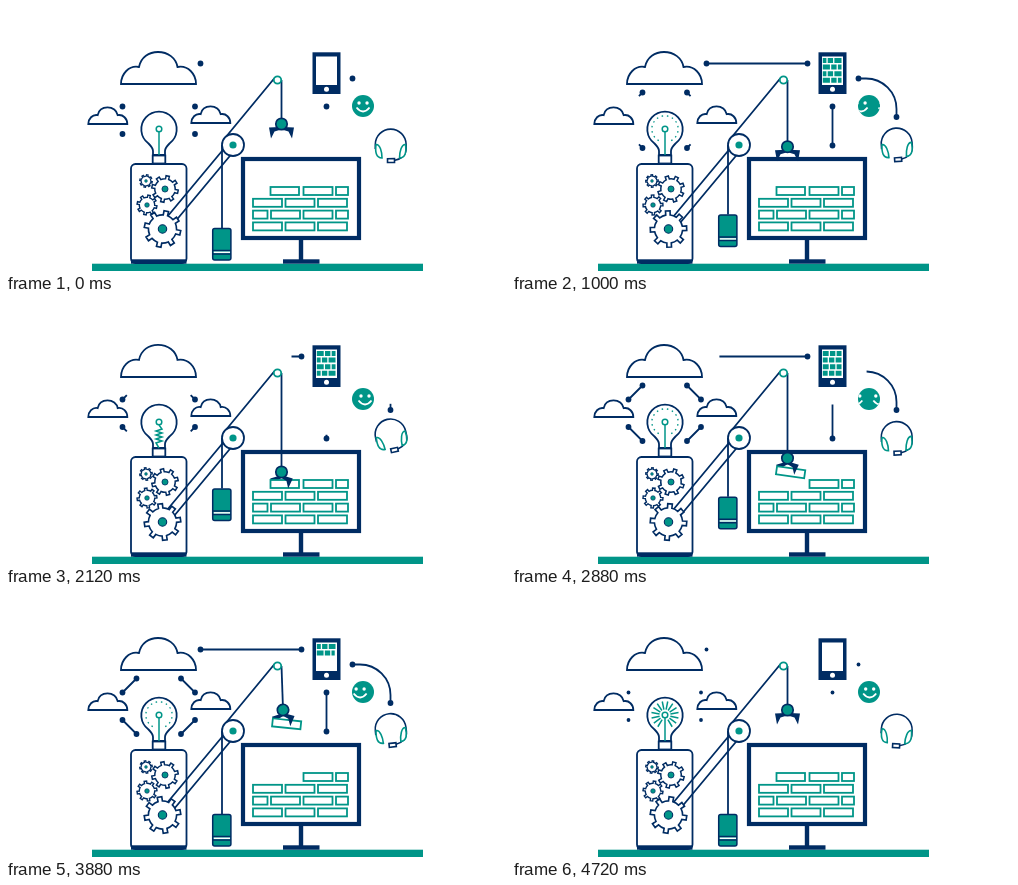
Write an HTML page that moves like this. It is 500 by 265 pixels and loops after 4.76 s.

```html
<!DOCTYPE html>
<html lang="en">
<head>
<meta charset="utf-8">
<title>Building machine</title>
<style>
html, body { margin: 0; width: 100%; height: 100%; overflow: hidden; background: #fff; }
svg { display: block; width: 500px; height: 265px; }
.line { fill: none; stroke: #002c63; stroke-width: 1.8; }
.box { fill: #fff; stroke: #002c63; stroke-width: 1.8; }
.teal { fill: #009588; }
.navy { fill: #002c63; }
.white { fill: #fff; }
.wire { fill: none; stroke: #009588; stroke-width: 1.5; }
.brick { fill: #fff; stroke: #009588; stroke-width: 1.8; }
.cloud { vector-effect: non-scaling-stroke; }
</style>
</head>
<body>
<svg id="stage" viewBox="0 0 500 265">
  <defs>
    <path id="puff" class="box cloud" d="M0 0C0-10 8-19 18-17C20-27 28-32 37-32C47-32 55-26 56.5-17C67-19 75-10 75 0Z"/>
    <clipPath id="ball"><circle cx="357" cy="100" r="11"/></clipPath>
    <g id="face">
      <circle class="white" cx="353" cy="97" r="1.7"/><circle class="white" cx="361" cy="97" r="1.7"/>
      <path d="M350.5 101.5Q357 109.5 363.5 101.5" fill="none" stroke="#fff" stroke-width="1.8"/>
    </g>
  </defs>

  <rect class="teal" x="86" y="257.7" width="331" height="7.3"/>
  <g id="clouds"></g>
  <g id="links"></g>

  <rect class="box" x="125" y="158" width="55.5" height="99" rx="4.5"/>
  <rect class="navy" x="125" y="253.3" width="55.5" height="4.4"/>
  <path class="box" d="M147 149V145C147 142 145 140 142.5 137.5A17.7 17.7 0 1 1 163.5 137.5C161 140 159 142 159 145V149Z"/>
  <rect class="box" x="146.7" y="149.5" width="12.6" height="8"/>
  <path id="filament" class="wire"/>
  <circle class="wire" cx="153" cy="123" r="2.8"/>
  <path id="rays" class="wire"/>

  <rect x="237" y="153" width="116" height="79" class="box" style="stroke-width:4.2"/>
  <rect class="navy" x="292.8" y="234" width="4.4" height="20"/>
  <rect class="navy" x="277" y="253.3" width="36.5" height="4.4"/>
  <g id="wall"></g>

  <path class="line" d="M153.5 220L223.5 136M160.5 226L230.5 142M219 132L269 71.5"/>
  <g id="gears"></g>
  <path id="rope" class="line"/>
  <g id="weight">
    <rect class="teal" x="206.7" y="222.5" width="18.2" height="31.5" rx="2"/>
    <path class="line" d="M207 244.5H225M207 248H225" style="stroke-width:1.5"/>
    <path d="M207.5 246.3H224" stroke="#fff" stroke-width="1.5"/>
    <rect class="line" x="206.7" y="222.5" width="18.2" height="31.5" rx="2" style="stroke-width:1.5"/>
  </g>
  <circle class="box" cx="227" cy="139" r="11"/>
  <circle class="teal" cx="227" cy="139" r="3.6"/>

  <g id="swing">
    <path id="cable" class="line"/>
    <path id="jawL" class="navy" d="M-2 3L-12.5 3.5L-10.5 14.5L-7 7.5L-2 6Z"/>
    <rect id="held" class="brick" x="264.5" y="181" width="28.5" height="8"/>
    <path id="jawR" class="navy" d="M2 3L12.5 3.5L10.5 14.5L7 7.5L2 6Z"/>
    <circle id="hub" class="teal" r="5.7" stroke="#002c63" stroke-width="1.7"/>
  </g>
  <circle class="brick" cx="271.5" cy="74" r="3.7"/>

  <rect class="navy" x="306.5" y="46.3" width="28" height="41.7"/>
  <rect class="white" x="310" y="50.5" width="21" height="28.5"/>
  <circle class="white" cx="320.5" cy="83.3" r="2.5"/>
  <path id="screen" class="teal"/>

  <circle class="teal" cx="357" cy="100" r="11"/>
  <g clip-path="url(#ball)"><use id="faceA" href="#face"/><use id="faceB" href="#face"/></g>

  <g id="headset">
    <path class="line" style="stroke-width:1.6" d="M369.3 143V138.5A15.4 15.4 0 0 1 400.1 138.5V143C400 149 395 153.5 388 154.5"/>
    <path class="brick" style="stroke-width:1.6" d="M370 138.5C374 138 376 146 376 152C370 152 369 146 370 138.5ZM399.5 138.5C395.5 138 393.5 146 393.5 152C399.5 152 400.5 146 399.5 138.5Z"/>
    <rect class="box" x="381.5" y="152.7" width="7" height="3.8" style="stroke-width:1.6"/>
  </g>
</svg>
<script>
const LOOP = 4760, HALF = LOOP / 2, BEAT = LOOP / 5, TAU = 2 * Math.PI;
const $ = id => document.getElementById(id);

function add(parent, tag, attrs) {
  const el = document.createElementNS('http://www.w3.org/2000/svg', tag);
  for (const k in attrs) el.setAttribute(k, attrs[k]);
  return $(parent).appendChild(el);
}
const set = (el, name, value) => el.setAttribute(name, value);
const move = (id, value) => set($(id), 'transform', value);
const clamp = x => Math.min(1, Math.max(0, x));
const easeOut = x => 1 - (1 - clamp(x)) ** 2;

// Smooth step from 0 to 1 between two times.
function ramp(t, start, end) {
  const x = clamp((t - start) / (end - start));
  return x * x * (3 - 2 * x);
}

const clouds = [[115, 78, 1], [82.3, 118, .52], [185.3, 117, .52]].map(([x, y, s]) =>
  ({ el: add('clouds', 'use', { href: '#puff' }), x, y, s }));

// Even rows are shifted by half a brick; the crane takes the first one.
for (let row = 0; row < 4; row++)
  for (let i = row ? 0 : 2; i < 4; i++) {
    const start = (row % 2 ? 247 : 232.5) + i * 32.5;
    const left = Math.max(247, start), right = Math.min(342, start + 29);
    if (right > left) add('wall', 'rect', { class: 'brick', x: left, y: 181 + row * 11.8, width: right - left, height: 8 });
  }

function gearPath(r, teeth) {
  const rim = r * .77;
  const at = (turn, radius) => `${Math.cos(turn * TAU) * radius} ${Math.sin(turn * TAU) * radius}`;
  let d = 'M' + at(-.2 / teeth, rim);
  for (let i = 0; i < teeth; i++)
    d += `L${at((i - .16) / teeth, r)}L${at((i + .16) / teeth, r)}L${at((i + .2) / teeth, rim)}`
       + `A${rim} ${rim} 0 0 1 ${at((i + .8) / teeth, rim)}`;
  return d + 'Z';
}
const gears = [[140, 175, 6.3], [159, 183, 13.3], [141, 199, 10], [156.5, 223, 18.3]].map(([x, y, r], i) => {
  const el = add('gears', 'path', { class: 'box', d: gearPath(r, 8), style: `stroke-width:${1.1 + r * .03}` });
  add('gears', 'circle', { class: 'teal', cx: x, cy: y, r: r * .23, stroke: '#002c63', 'stroke-width': r * .06 });
  return { el, x, y, dir: i === 1 ? -1 : 1 };
});

function makeLink(d) {
  const path = add('links', 'path', { class: 'line', d });
  const length = path.getTotalLength();
  const dots = [0, length].map(s => {
    const p = path.getPointAtLength(s);
    return add('links', 'circle', { class: 'navy', cx: p.x, cy: p.y });
  });
  return { path, length, dots };
}
function showLink({ path, length, dots }, from, to, r) {
  set(path, 'stroke-dasharray', `0 ${from * length} ${Math.max(0, to - from) * length} 999`);
  set(path, 'visibility', to - from > .005 ? 'visible' : 'hidden');
  set(dots[0], 'r', from < .03 ? r : 0);
  set(dots[1], 'r', to > .97 ? r : 0);
}
const cloudLinks = [];
for (const sx of [-1, 1])
  for (const sy of [-1, 1])
    cloudLinks.push(makeLink(`M${152.75 + sx * 36.25} ${114.25 + sy * 13.75}l${-sx * 14} ${sy * 14}`));
const phoneLinks = ['M194.5 57.5H295.5', 'M320.5 100.5V139.5', 'M346.5 72.5H354A30.5 30.5 0 0 1 384.5 103V111'].map(makeLink);

function drawLinks(t) {
  const p = t % HALF, r = 2.9 - ramp(p, 2200, 2340) + ramp(p, 2340, HALF);
  const outer = ramp(p, 800, 1100) - ramp(p, 1300, 1490);
  const inner = ramp(p, 0, 450) - ramp(p, 1850, 2280);
  cloudLinks.forEach(link => showLink(link, outer, inner, r));
  const head = easeOut(p / 780), tail = easeOut((p - 1600) / 760);
  phoneLinks.forEach(link => t < HALF ? showLink(link, tail, head, r) : showLink(link, 1 - head, 1 - tail, r));
}

function drawBulb(t) {
  const beat = t / BEAT % 1, wave = 3 * (ramp(beat, .08, .23) - ramp(beat, .23, .42));
  let d = 'M153 126';
  for (let i = 1; i < 9; i++) d += `L${153 + (i % 2 ? wave : -wave)} ${128 + i * 2}`;
  set($('filament'), 'd', d + 'L153 149');

  // Each flash starts as a ring of dots, stretches into rays and ends as a wider ring.
  const q = (beat + .5) % 1;
  const near = 8 - 2.5 * ramp(q, .08, .3) + 7 * ramp(q, .46, .53), far = 7 + 6.8 * easeOut(q / .5);
  d = '';
  if (t > BEAT / 2 && q < .65)
    for (let i = 0; i < 14; i++) {
      const a = (110 + (i + .5) / 14 * 320) / 360 * TAU, c = Math.cos(a), s = Math.sin(a);
      d += `M${153 + c * near} ${123 + s * near}L${153 + c * far} ${123 + s * far}`;
    }
  set($('rays'), 'd', d);
}

function drawCrane(t) {
  const drop = 55 * (ramp(t, 400, 1760) - ramp(t, 2610, 3440)), y = 118 + drop;
  const grip = 14 * (ramp(t, 1850, 2120) - ramp(t, 4250, 4400));
  move('swing', `rotate(${-2 * Math.sin(clamp((t - 3440) / 880) * Math.PI)} 275.5 74)`);
  set($('cable'), 'd', `M275.5 74V${y}`);
  move('hub', `translate(275.5 ${y})`);
  move('jawL', `translate(275.5 ${y}) rotate(${-grip})`);
  move('jawR', `translate(275.5 ${y}) rotate(${grip})`);

  const fall = clamp((t - 4320) / 240) ** 2;
  const lift = t < HALF ? 0 : (55 - drop) * (1 - fall);
  const tilt = 8 * (ramp(t, 2610, 2800) - ramp(t, 4320, 4520));
  move('held', `translate(0 ${-lift}) rotate(${tilt} 264.5 185)`);
  move('weight', `translate(0 ${-drop * .59})`);
  set($('rope'), 'd', `M216 139V${222 - drop * .59}`);
}

function drawScreen(t) {
  const count = 12 * (ramp(t, 80, 480) - ramp(t, 3600, 4150));
  const shift = 2 * Math.cos(t / HALF * TAU);
  let d = '';
  for (let i = 0; i < 12; i++) {
    const row = Math.floor(i / 3), col = i % 3, s = row % 2 ? -shift : shift;
    const edge = n => 310.8 + n * 6.67 + (n % 3 ? s : 0);
    const w = (edge(col + 1) - edge(col) - 1.3) * clamp(count - i);
    if (w > 0) d += `M${edge(col)} ${52 + row * 6.6}h${w}v5h${-w}z`;
  }
  set($('screen'), 'd', d);
}

function draw(t) {
  const beat = t / BEAT % 1;
  const puff = ramp(beat, .2, .5) - ramp(beat, .5, .95);
  for (const { el, x, y, s } of clouds)
    set(el, 'transform', `translate(${x} ${y}) scale(${s} ${s * (1 + .15 * puff)})`);
  for (const { el, x, y, dir } of gears)
    set(el, 'transform', `translate(${x} ${y}) rotate(${dir * t / LOOP * 360 + 12})`);
  drawLinks(t);
  drawBulb(t);
  drawCrane(t);
  drawScreen(t);

  // The face travels round the ball, running ahead in the middle of each turn.
  const x = t / HALF % 1, turn = 24 * x + 6 * (1 - (2 * x - 1) ** 6);
  move('faceA', `translate(${turn} 0)`);
  move('faceB', `translate(${turn - 24} 0)`);

  const nod = -13 * Math.sin(beat * TAU);
  move('headset', `translate(0 ${-Math.abs(nod) * .25}) rotate(${nod} 385 139)`);
}

function tick() {
  draw(performance.now() % LOOP);
  requestAnimationFrame(tick);
}
tick();
</script>
</body>
</html>
```
